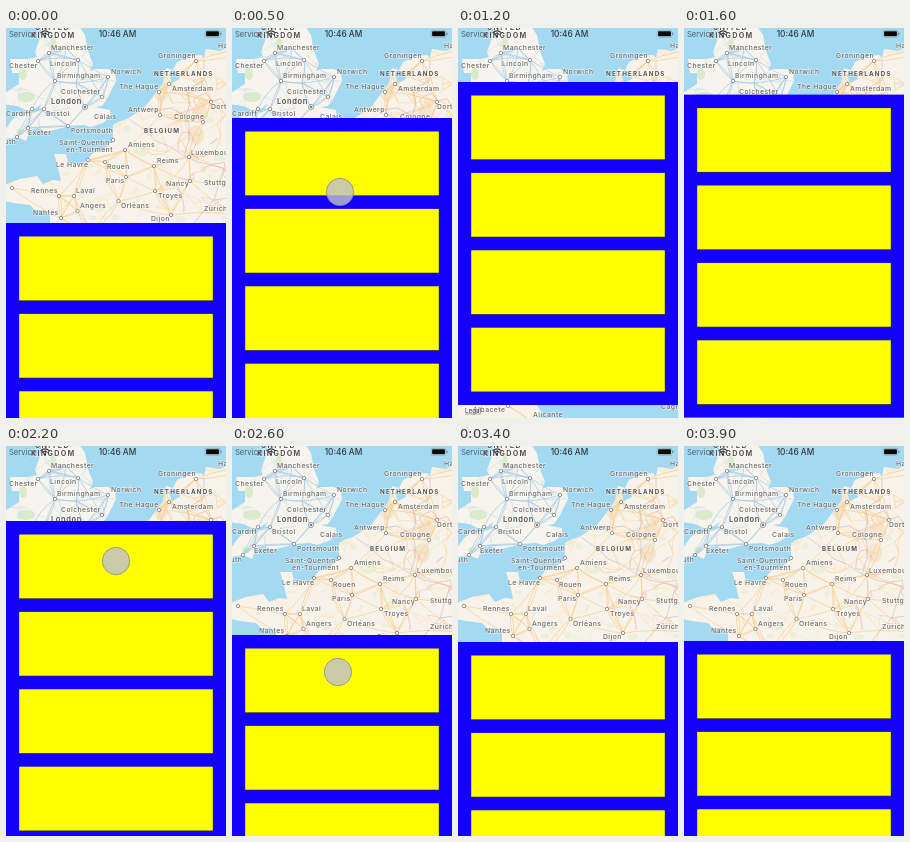
An HTML page that plays this animation: 220 px wide and 390 px high, repeating every 4 s.

```html
<!DOCTYPE html>
<html lang="en">
<head>
<meta charset="utf-8">
<title>Map with sliding sheet</title>
<style>
  html, body { margin: 0; width: 100%; height: 100%; overflow: hidden; background: #a4d9f2; }
  svg { display: block; width: 220px; height: 390px; }
  text { font-family: Inter, "Open Sans", sans-serif; }
  .city { font-size: 6.8px; letter-spacing: .45px; font-weight: 500; fill: #6a6866; }
  .capital { font-size: 7.5px; letter-spacing: .6px; font-weight: 600; fill: #55534f; }
  .land { font-size: 6.2px; letter-spacing: 1.2px; font-weight: 700; fill: #555354; }
  .big { font-size: 7.2px; letter-spacing: 1.3px; font-weight: 700; fill: #555354; }
  #labels text { paint-order: stroke; stroke: #fff; stroke-opacity: .6; stroke-width: 1.3px; stroke-linejoin: round; }
  #status text { fill: #343a40; }
</style>
</head>
<body>
<svg viewBox="0 0 220 390" xmlns="http://www.w3.org/2000/svg">
  <defs>
    <clipPath id="west">
      <path id="britain" d="M36 -5L34 10 29 24 31 29 22 31 4 31 6 45 13 45 13 56 2 63 -8 69 -3 76 11 78 20 82 27 82 36 76 31 84 12 87 6 92 -3 105 -9 112 11 109 20 113 24 102 32 100 40 104 48 102 63 98 78 97 85 99 97 95 104 89 104 82 93 80 89 79 96 78 101 71 110 53 109 45 102 41 89 41 84 43 87 36 82 23 79 7 71 -5Z"/>
    </clipPath>
    <clipPath id="east">
      <path id="mainland" d="M230 8L221 20 214 23 200 21 198 30 195 27 184 28 171 34 167 42 160 40 157 55 149 66 139 79 129 86 121 91 112 94 107 97 107 113 99 120 87 125 82 131 77 136 62 135 60 126 48 126 51 135 55 153 47 152 37 156 31 148 14 151 1 156 -5 160 -5 172 8 175 24 177 29 182 39 182 44 188 44 197 61 216 60 231 55 279 -10 276 -10 400 72 400 75 392 84 386 76 371 120 300 230 290Z"/>
    </clipPath>
  </defs>

  <rect width="220" height="390" fill="#a4d9f2"/>
  <g clip-path="url(#west)">
    <rect width="220" height="120" fill="#f6f4ec"/>
    <g fill="#d9ebc8">
      <ellipse cx="20" cy="69" rx="9" ry="5"/>
      <ellipse cx="17" cy="46" rx="4" ry="6"/>
      <ellipse cx="14" cy="104" rx="4" ry="3"/>
      <ellipse cx="47" cy="16" rx="3" ry="7"/>
    </g>
    <g id="motorways" fill="none"></g>
  </g>
  <g clip-path="url(#east)">
    <rect width="220" height="390" fill="#f8f3ea"/>
    <g fill="#ecd9b4" opacity=".5">
      <ellipse cx="194" cy="84" rx="8" ry="9"/>
      <ellipse cx="190" cy="107" rx="8" ry="10"/>
      <ellipse cx="155" cy="64" rx="7" ry="10"/>
    </g>
    <g id="woods" fill="#dfecca"></g>
    <g id="roads" fill="none"></g>
    <path d="M167 42q6 3 7 9l-8 4 -3 -8Z" fill="#a4d9f2"/>
    <path d="M123 91L140 103 150 113 163 118 178 128 192 134 218 140 208 172 200 180 184 200 181 212M198 32V52L181 62 184 75 180 88 183 97V112L178 128M136 82L150 82 165 80 178 87 181 94M208 172L222 170"
      fill="none" stroke="#b9a9b4" stroke-width=".7" opacity=".7"/>
  </g>
  <g id="labels"></g>

  <g id="sheet">
    <rect width="220" height="323" fill="#1400ff"/>
  </g>
  <circle id="touch" r="13.7" fill="#bebfcc" fill-opacity=".81" stroke="#74748a" stroke-width=".6"/>

  <g id="status">
    <text x="3" y="8.6" font-size="7.6" fill-opacity=".75">Service</text>
    <g fill="none" stroke="#343a40" stroke-width="1.1">
      <path d="M34.5 4.8Q39 .9 43.5 4.8M36.3 6.7Q39 4.4 41.7 6.7"/>
      <circle cx="39" cy="8.3" r=".5"/>
    </g>
    <text x="111.5" y="8.6" font-size="8.3" font-weight="500" text-anchor="middle">10:46 AM</text>
    <rect x="199.2" y="2.4" width="14.6" height="6.8" rx="1.5" fill="#eef6fa" fill-opacity=".5" stroke="#1b1e22" stroke-width=".4" stroke-opacity=".6"/>
    <rect x="200.1" y="3.3" width="12.8" height="5" rx=".8" fill="#0a0a0a"/>
    <rect x="214.4" y="4.6" width=".9" height="2.4" rx=".4" fill="#1b1e22" opacity=".6"/>
  </g>
</svg>
<script>
const $ = id => document.getElementById(id);

function add(parent, tag, attrs, text) {
  const el = document.createElementNS('http://www.w3.org/2000/svg', tag);
  for (const k in attrs) el.setAttribute(k, attrs[k]);
  if (text) el.textContent = text;
  parent.appendChild(el);
  return el;
}

let seed = 11;
const rnd = () => (seed = (seed * 16807) % 2147483647) / 2147483647;

// name, label x, label middle y, dot x, dot y
const north = [
  ['Manchester', 45, 20, 43, 25], ['Lincoln', 44, 36, 72, 32],
  ['Chester', 3, 38, 32, 33], ['Birmingham', 51, 48, 49, 53],
  ['Norwich', 105, 44, 102, 49], ['Colchester', 55, 64, 96, 69],
  ['Cardiff', 0, 86, 26, 81], ['Bristol', 40, 86, 38, 81],
  ['Exeter', 22, 105, 22, 100], ['Portsmouth', 65, 103, 62, 98],
  ['Plymouth', -24, 114, 11, 109]
];
const east = [
  ['Groningen', 152, 28, 190, 33], ['Hamburg', 212, 18, 248, 22],
  ['The Hague', 113, 59, 153, 64], ['Amsterdam', 166, 61, 163, 56],
  ['Antwerp', 122, 82, 154, 87], ['Dortmund', 205, 79, 205, 74],
  ['Cologne', 168, 89, 197, 94], ['Luxembourg', 185, 125, 183, 129],
  ['Stuttgart', 198, 155, 233, 150], ['Zürich', 198, 181, 223, 186]
];
const south = [
  ['Amiens', 122, 117, 119, 122], ['Le Havre', 50, 137, 82, 132],
  ['Rouen', 101, 139, 99, 134], ['Paris', 100, 153, 120, 149],
  ['Reims', 151, 133, 148, 138], ['Nancy', 160, 156, 184, 153],
  ['Troyes', 152, 168, 149, 163], ['Orléans', 115, 178, 112.5, 173],
  ['Rennes', 25, 163, 53, 168], ['Laval', 70, 163, 68, 168],
  ['Nantes', 27, 185, 55, 190], ['Angers', 74, 178, 71.5, 183],
  ['Dijon', 145, 191, 165, 187], ['Poitiers', 57, 200, 86, 205],
  ['Albacete', 15, 382, 50, 378], ['Alicante', 75, 387, 73, 394]
];
const cities = [...north, ...east, ...south];

// name, x, middle y, class
const others = [
  ['UNITED', 29, 0, 'big'], ['KINGDOM', 25, 8, 'big'],
  ['NETHERLANDS', 148, 46, 'land'], ['BELGIUM', 138, 103, 'land'],
  ['FRANCE', 106, 204, 'big'], ['SWITZERLAND', 192, 202, 'land'],
  ['London', 45, 74, 'capital'], ['Calais', 88, 89, 'city'],
  ['Saint-Quentin-', 53, 114.5, 'city'], ['en-Tourment', 60, 121.5, 'city'],
  ['Cagliari', 203, 379, 'city']
];

// Joins each node to its nearest neighbours with slightly bent lines
function link(id, nodes, count, reach, stroke, width) {
  let d = '';
  for (const a of nodes) {
    nodes.filter(b => b !== a)
      .map(b => ({ b, r: Math.hypot(a.x - b.x, a.y - b.y) }))
      .sort((p, q) => p.r - q.r).slice(0, count)
      .filter(p => p.r < reach)
      .forEach(({ b, r }) => {
        const bend = () => (rnd() - .5) * r * .3;
        d += `M${a.x} ${a.y}Q${(a.x + b.x) / 2 + bend()} ${(a.y + b.y) / 2 + bend()} ${b.x} ${b.y}`;
      });
  }
  add($(id), 'path', { d, stroke, 'stroke-width': width });
}

const spread = (n, x, y, w, h) =>
  Array.from({ length: n }, () => ({ x: x + rnd() * w, y: y + rnd() * h }));
const hubs = list => list.map(c => ({ x: c[3], y: c[4] }));

function drawRoads() {
  const london = { x: 79, y: 79 };
  link('motorways', spread(55, 0, -5, 110, 118), 2, 22, '#d5e3ea', .6);
  link('motorways', [...hubs(north), london, { x: 60, y: 20 }, { x: 70, y: 55 }], 4, 50, '#aacbe6', .75);
  link('roads', spread(130, -5, 15, 235, 200), 3, 28, '#f8e4c2', .5);
  link('roads', spread(50, 132, 45, 90, 85), 3, 22, '#f8d9a8', .55);
  link('roads', spread(40, 170, 65, 55, 120), 2, 22, '#f3c3bb', .6);
  link('roads', [...hubs(east), ...hubs(south), { x: 6, y: 160 }], 4, 62, '#f8cf94', .75);
}

function drawMap() {
  for (const p of spread(26, 60, 90, 160, 125)) {
    add($('woods'), 'ellipse', { cx: p.x, cy: p.y, rx: 2 + rnd() * 4, ry: 1.5 + rnd() * 2.5, opacity: .5 });
  }
  drawRoads();
  const g = $('labels');
  const dot = (cx, cy, r = 1.7) =>
    add(g, 'circle', { cx, cy, r, fill: '#fff', stroke: '#7d7a77', 'stroke-width': .75 });
  const label = (text, x, y, cls) => add(g, 'text', { x, y: y + 2.4, class: cls }, text);
  cities.forEach(c => dot(c[3], c[4]));
  dot(6, 160);
  dot(107, 112);
  dot(79, 79, 2.5);
  add(g, 'circle', { cx: 79, cy: 79, r: 1.2, fill: '#7d7a77' });
  cities.forEach(([name, x, y]) => label(name, x, y, 'city'));
  others.forEach(o => label(...o));
  add(g, 'text', { x: 7, y: 384.6, 'font-size': 6.3, fill: '#333', 'text-decoration': 'underline' }, 'Legal');
}

function drawCards() {
  for (let i = 0; i < 4; i++) {
    const y = 13.5 + i * 77.4;
    const card = (dy, fill) =>
      add($('sheet'), 'rect', { x: 13.2, y: y + dy, width: 193.6, height: 63.8, fill });
    card(.6, '#3a3520');
    card(0, '#ff0');
  }
}

// Monotone cubic through [time, value] keys
function curve(keys) {
  const slope = i => (keys[i + 1][1] - keys[i][1]) / (keys[i + 1][0] - keys[i][0]);
  const tangent = i => {
    if (i === 0 || i === keys.length - 1) return 0;
    const a = slope(i - 1), b = slope(i);
    return a * b <= 0 ? 0 : 2 * a * b / (a + b);
  };
  return t => {
    if (t <= keys[0][0]) return keys[0][1];
    const i = keys.findIndex((k, n) => n < keys.length - 1 && t < keys[n + 1][0]);
    if (i < 0) return keys[keys.length - 1][1];
    const [t0, v0] = keys[i], [t1, v1] = keys[i + 1];
    const h = t1 - t0, u = (t - t0) / h, w = 1 - u;
    return v0 * (1 + 2 * u) * w * w + tangent(i) * h * u * w * w
      + v1 * u * u * (3 - 2 * u) - tangent(i + 1) * h * u * u * w;
  };
}

const sheetTop = curve([
  [100, 195], [200, 189], [300, 165], [400, 128], [500, 90], [600, 60.5], [800, 50], [1050, 47],
  [1200, 54], [1300, 60], [1450, 65], [1700, 67],
  [2000, 67], [2200, 75], [2400, 126], [2600, 189], [2750, 199], [3000, 204],
  [3150, 201], [3300, 197], [3600, 195]
]);
const drags = [
  { from: 100, to: 1100, x: curve([[100, 108], [1100, 108]]),
    y: curve([[100, 269], [200, 263], [300, 239], [400, 202], [500, 164], [600, 132], [800, 112], [1050, 105]]) },
  { from: 2000, to: 3050, x: curve([[2200, 110], [2600, 106], [3000, 105]]),
    y: curve([[2000, 107], [2200, 115], [2400, 165], [2600, 226], [2800, 265], [3000, 281]]) }
];

// The picture advances in steps of 100 ms
function draw(ms) {
  const t = Math.floor((ms % 4000) / 100) * 100;
  $('sheet').setAttribute('transform', `translate(0 ${sheetTop(t)})`);
  const drag = drags.find(d => t >= d.from && t < d.to);
  $('touch').setAttribute('visibility', drag ? 'visible' : 'hidden');
  if (drag) $('touch').setAttribute('transform', `translate(${drag.x(t)} ${drag.y(t)})`);
}

drawMap();
drawCards();
const start = performance.now();
function tick() {
  draw(performance.now() - start);
  requestAnimationFrame(tick);
}
tick();
</script>
</body>
</html>
```
